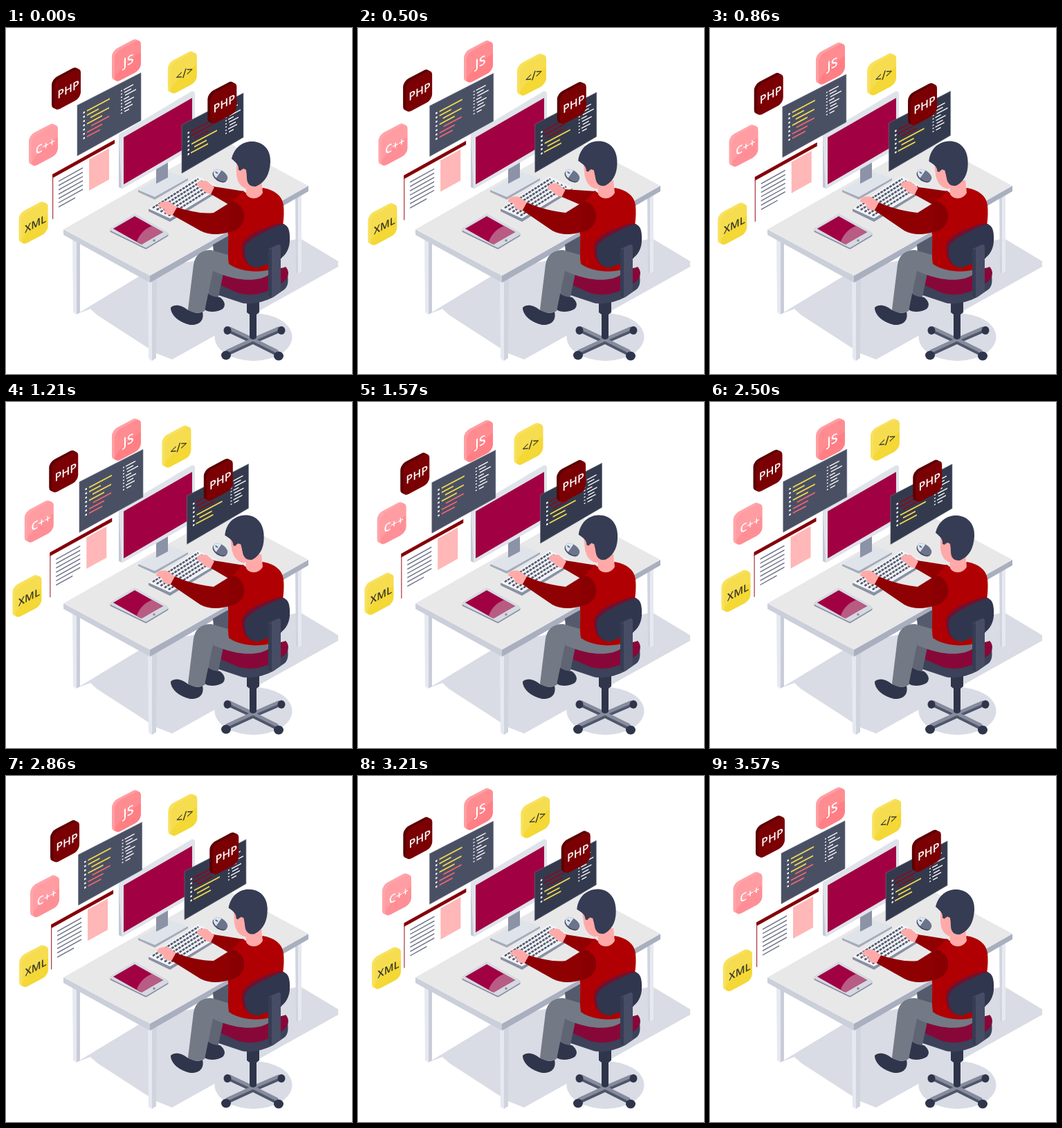
Recreate the animation shown at these times as an HTML page. Size 500x500 px, loop 3.64 s.

```html
<!DOCTYPE html>
<html lang="en">
<head>
<meta charset="utf-8">
<title>Developer at work</title>
<style>
  html, body { margin: 0; width: 100%; height: 100%; overflow: hidden; background: #fff; }
  svg { display: block; width: 100vw; height: 100vh; }
  text { font-family: "Open Sans", "Noto Sans", sans-serif; font-weight: 600; text-anchor: middle; }
</style>
</head>
<body>
<svg viewBox="0 0 500 500">
  <g id="floor" fill="#d9dce4">
    <path d="M103 413 207 350 425 304 480 337V345L240 479 217 470 132 415 122 406Z"/>
    <ellipse cx="357.500" cy="446.500" rx="56" ry="34.500"/>
  </g>

  <g id="desk">
    <path fill="#cfd4de" d="M418 238H422V355L419 353Z"/>
    <path fill="#e6e9ef" d="M422 236H427V352L422 355Z"/>
    <path fill="#e6e9ef" d="M96 300H102V414L97 411Z"/>
    <path fill="#c8cdd8" d="M102 303H107V411L102 414Z"/>
    <path fill="#e6e9ef" d="M205 360H211V481L206 478Z"/>
    <path fill="#cfd4de" d="M211 360H218L217 477 211 481Z"/>
    <path fill="#cacfda" d="M83 291 208 358V368L83 299Z"/>
    <path fill="#a9afbf" d="M208 358 437 228V236L208 368Z"/>
    <path fill="#e8e8e9" d="M83 291 312 161 437 228 208 358Z"/>
  </g>

  <g id="monitor">
    <path fill="#a5abba" d="M191 234 215 244 263 217V220L215 248 191 237Z"/>
    <path fill="#dfe3ea" d="M191 234 237 208 263 217 215 244Z"/>
    <path fill="#8c93a6" d="M217 200 234 190V216L217 225Z"/>
    <path fill="#c3c8d4" d="M163 154 168 151V232L163 230Z"/>
    <path fill="#dfe3ea" d="M163 154 269 91 273 93V172L167 233Z"/>
    <path fill="#a10143" d="M170 158 269 101V168L170 226Z"/>
  </g>

  <g id="tablet" stroke-linejoin="round">
    <path fill="#8b91a4" stroke="#8b91a4" stroke-width="5" d="M153 293 186 273 232 299 202 317Z"/>
    <path fill="#d5d9e2" stroke="#d5d9e2" stroke-width="5" d="M153 291 186 271 232 297 202 315Z"/>
    <path fill="#a10143" d="M155 290 186 272 227 295 194 312Z"/>
    <path fill="#b85c83" d="M189 309C192 299 199 291 211 286L227 295 196 313Z"/>
    <circle cx="214" cy="307" r="1.800" fill="#8b91a4"/>
  </g>

  <g id="keyboard">
    <path fill="#8a91a4" d="M206 261 237 275 310 231V235L237 280 206 265Z"/>
    <path fill="#f1f3f7" d="M206 261 277 214 310 231 237 275Z"/>
    <g id="keys" stroke="#50576c" stroke-width="2.600" stroke-dasharray="3.800 1.300"/>
  </g>
  <g id="mouse" transform="translate(310 213) rotate(35)">
    <ellipse cy="2" rx="11.500" ry="7" fill="#464d65"/>
    <ellipse rx="11.500" ry="7" fill="#6c748b"/>
    <path fill="#dce4f2" d="M-3 -6.800C-14 -5 -14 5 -3 6.800Z"/>
    <path stroke="#454c62" stroke-width="1.500" d="M-9 0H-5"/>
  </g>

  <g id="windows"></g>

  <g id="base">
    <g fill="none" stroke-linecap="round">
      <path stroke="#4f566b" stroke-width="7" d="M323 437 357 453 394 437M320 470 357 453 391 470"/>
      <path stroke="#868c9c" stroke-width="5" d="M323 434 357 450 394 434M320 467 357 450 391 467"/>
    </g>
    <g fill="#2f354a">
      <ellipse cx="320" cy="437" rx="5.500" ry="6"/><ellipse cx="398" cy="437" rx="5.500" ry="6"/>
      <ellipse cx="318" cy="473" rx="7" ry="6.500"/><ellipse cx="394" cy="474" rx="7" ry="6.500"/>
      <path d="M348 386H366V411L362 414V447C361 451 353 451 352 447V414L348 411Z"/>
    </g>
  </g>

  <g id="seat">
    <path fill="#3b4259" d="M305 356C293 366 292 379 304 385L340 397C354 401 372 396 386 389L402 378C408 373 408 366 407 356Z"/>
    <path fill="#870838" d="M303 358C320 350 390 352 404 345 411 352 408 362 401 367L378 380C362 387 345 387 331 381L309 371C303 368 301 362 303 358Z"/>
  </g>

  <g id="legs">
    <path fill="#555b6c" d="M299 313 322 300 330 340 300 325Z"/>
    <path fill="#5f6573" d="M298 345 314 355 306 393 291 390Z"/>
    <path fill="#2f354a" d="M291 383C296 388 305 389 309 389 318 396 317 402 313 406 305 411 292 411 287 407Z"/>
    <path fill="#747986" d="M388 346C382 365 345 372 299 351L287 409C279 413 267 412 263 407L271 342C273 328 283 320 297 321L335 332Z"/>
    <path fill="#2f354a" d="M238 404C244 398 255 401 262 407 270 412 279 413 284 410 287 423 279 430 266 429 252 426 238 416 238 404Z"/>
  </g>

  <g id="body">
    <path id="rightArm" fill="#930002"/>
    <path fill="#b00003" d="M342 235C351 243 363 242 371 231 388 234 399 242 401 256 403 275 399 292 396 306L391 345C375 355 340 354 322 341 319 322 324 304 319 288L324 255Z"/>
    <path fill="#ffaaa8" d="M346 220 347 240C352 249 366 248 371 238L369 220Z"/>
    <path id="leftArm" fill="#8f0003"/>
    <path fill="#890003" d="M322 252C336 248 346 262 344 276 341 290 329 295 317 295 326 284 328 267 318 258Z"/>
    <path id="rightHand" fill="#ffaaa8" d="M276 228C274 223 283 219 290 221L301 230 296 240C289 239 285 236 282 231Z"/>
    <path id="leftHand" fill="#ffaaa8" d="M220 258C219 252 229 249 236 251L247 259 241 270C235 271 227 268 229 262Z"/>
    <g id="head">
      <path fill="#ffaaa8" d="M333 190 333 211C334 222 338 229 347 232L362 229V192Z"/>
      <path fill="#363c54" d="M326 189C330 172 343 163 357 164 373 165 383 177 382 194 381 211 375 223 361 229 352 230 348 224 348 216L347 205 343 203 340 207 336 205C337 198 332 194 326 189Z"/>
      <ellipse cx="342.500" cy="212" rx="5" ry="8" fill="#ffaaa8"/>
    </g>
  </g>

  <g id="backrest">
    <path fill="#72102f" d="M341 317C340 304 362 292 391 283 403 280 408 286 408 299L398 333 362 346C347 345 341 334 341 317Z"/>
    <path fill="#30364d" d="M345 321C345 307 366 298 395 285 407 281 411 290 410 309 409 323 401 332 390 337L365 346C351 347 345 336 345 321Z"/>
    <path fill="#464d65" d="M380 319 393 313Q397 312 397 317V381L386 389 379 390Z"/>
    <path fill="#363c54" d="M379 322 384 318V390L379 388Z"/>
  </g>

  <g id="tiles"></g>
</svg>

<script>
const LOOP = 3640, STEPS = 51;
const $ = id => document.getElementById(id);
const line = (x, y, length, color, width = 1.8) =>
  `<path stroke="${color}" stroke-width="${width}" d="M${x} ${y}h${length}"/>`;
const skewed = (x, y, slope, content) =>
  `<g transform="matrix(1 ${-slope} 0 1 ${x} ${y})">${content}</g>`;

// Each mover: x and y swing as mean + amplitude * cos(turn - phase).
const movers = [];
function addMover(parent, content, x, ax, px, y, ay, py) {
  const g = document.createElementNS('http://www.w3.org/2000/svg', 'g');
  g.innerHTML = content;
  $(parent).append(g);
  movers.push({ g, x, ax, px, y, ay, py });
}

function codeWindow(fill, outline, bars) {
  let rows = '';
  bars.forEach(([x, length, color], i) => {
    const y = 15.5 + i * 6.2;
    rows += line(8.5, y, 2.5, '#fff', 2.4) + line(x, y, length, color, 2);
  });
  [14, 10, 16, 8, 14, 9, 13, 7].forEach((length, i) => {
    const y = 13 + i * 4.6;
    rows += line(63, y, 2, '#fff', 1.5) + line(67 + i % 3, y, length, '#fff', 1.5);
  });
  return `<path fill="${fill}" stroke="#6b7183" stroke-width=".6" d="${outline}"/>` + skewed(0, 47, .53, rows);
}

function page() {
  let rows = '<path fill="#fff" d="M0 0H90V65H0Z"/><path fill="#850008" d="M0 0H90V5.500H0Z"/>' +
    '<path fill="#a8343a" d="M0 4H1.200V65H0Z"/><path fill="#ffb7b8" d="M53 8H82V53H53Z"/>';
  for (let i = 0; i < 7; i++) rows += line(9, 15 + i * 6.2, i === 6 ? 24 : 35, '#70768a', 1.7);
  return skewed(0, 50, .555, rows);
}

function tile(label, size, front, edge, ink, gloss = 0) {
  const slab = (dx, dy, fill) =>
    `<rect x="${dx}" y="${dy}" width="38" height="45" rx="8" fill="${fill}"/>`;
  return skewed(4, 19, .53, slab(-4, -4, edge) + slab(-2, -2, edge) + slab(0, 0, front) +
    `<path fill="#fff" opacity="${gloss}" d="M0 36V8Q0 0 8 0H30Q38 0 38 8V20Q14 22 0 36Z"/>` +
    `<text x="20" y="29" font-size="${size}" fill="${ink}">${label}</text>`);
}

for (let row = 0; row < 5; row++) {
  const x = 212 + row * 5.7, y = 260 + row * 2.8;
  $('keys').innerHTML += `<path d="M${x} ${y}l66 -42"/>`;
}

const yellow = '#f2d94e', red = '#ee6670', wine = '#8c0a1c';
addMover('windows', codeWindow('#4a5064', 'M0 47 92 0V69L0 120Z',
  [[14, 33, yellow], [14, 17, yellow], [19, 27, yellow], [14, 22, yellow], [20, 26, red], [14, 22, red], [14, 19, red]]),
  105, -2, 0, 67.2, -2.5, 0);
addMover('windows', page(), 64.5, 2.5, 0, 165.5, -4, 0);
addMover('windows', codeWindow('#343a4e', 'M0 46 89 0V64L0 116Z',
  [[13, 25, wine], [13, 31, wine], [18, 22, wine], [14, 37, yellow], [18, 18, yellow], [13, 25, yellow]]),
  259, -5, 0, 91, 3, 0);

const dark = '#3d3929', gold = ['#f4d835', '#f9e15c', dark, .13];
const php = tile('PHP', 16, '#7a0004', '#5c0003', '#fff');
addMover('tiles', php, 63.5, 2.5, 0, 65.5, -8.5, 0);
addMover('tiles', tile('JS', 18, '#ff7f85', '#ff9fa3', '#fff', .1), 153, 0, 0, 21.3, -5.2, 0);
addMover('tiles', tile('&lt;/&gt;', 16, ...gold), 230.2, 5, .88, 30.5, 6.5, .17);
addMover('tiles', tile('C++', 16, '#ff8f96', '#ffa5aa', '#fff', .12), 31, 4.2, .83, 142, 4.3, .58);
addMover('tiles', tile('XML', 15, ...gold), 14.6, 5.4, .88, 247.7, 5.3, .15);
addMover('tiles', php, 290, 4.3, .8, 81, 3.7, .55);

// Smoothly eased value between [time, value] keys.
function track(ms, keys) {
  const i = keys.findIndex(([t]) => t > ms);
  if (i < 0) return keys.at(-1)[1];
  const [t0, a] = keys[i - 1], [t1, b] = keys[i];
  const p = (ms - t0) / (t1 - t0);
  return a + (b - a) * p * p * (3 - 2 * p);
}
const headKeys = [[0, 0], [700, 1], [1300, 1], [2100, 0], [2600, 0], [3150, 1], [3250, 1], [3560, 0]];
const leftKeys = [[0, 0], [450, 1], [2550, 1], [3150, 0]];
const rightKeys = [[0, 0], [500, .3], [1000, 0], [1600, 0], [2000, 1], [2450, 0]];

function draw(now) {
  const step = Math.floor(now % LOOP / LOOP * STEPS + .1) % STEPS;
  const turn = step / STEPS, ms = turn * LOOP;
  const swing = phase => Math.cos(2 * Math.PI * (turn - phase));
  for (const m of movers) {
    const x = m.x + m.ax * swing(m.px), y = m.y + m.ay * swing(m.py);
    m.g.setAttribute('transform', `translate(${x} ${y})`);
  }

  const tilt = track(ms, headKeys);
  $('head').setAttribute('transform', `translate(${-4 * tilt} ${-tilt}) rotate(${-8 * tilt} 357 232)`);

  const l = track(ms, leftKeys), lx = -3 * l, ly = -7 * l;
  $('leftHand').setAttribute('transform', `translate(${lx} ${ly})`);
  $('leftArm').setAttribute('d', `M${247 + lx} ${259 + ly}C265 ${265 + ly / 2} 285 ${269 + ly / 2} 300 267L324 252C346 258 348 285 325 294 308 300 293 299 281 293L${240 + lx} ${270 + ly}Z`);

  const r = track(ms, rightKeys), rx = -5 * r, ry = 13 * r;
  $('rightHand').setAttribute('transform', `translate(${rx} ${ry})`);
  $('rightArm').setAttribute('d', `M${300 + rx} ${229 + ry}L344 236 350 256 325 257 ${296 + rx} ${240 + ry}Z`);
  requestAnimationFrame(draw);
}
draw(0);
</script>
</body>
</html>
```
